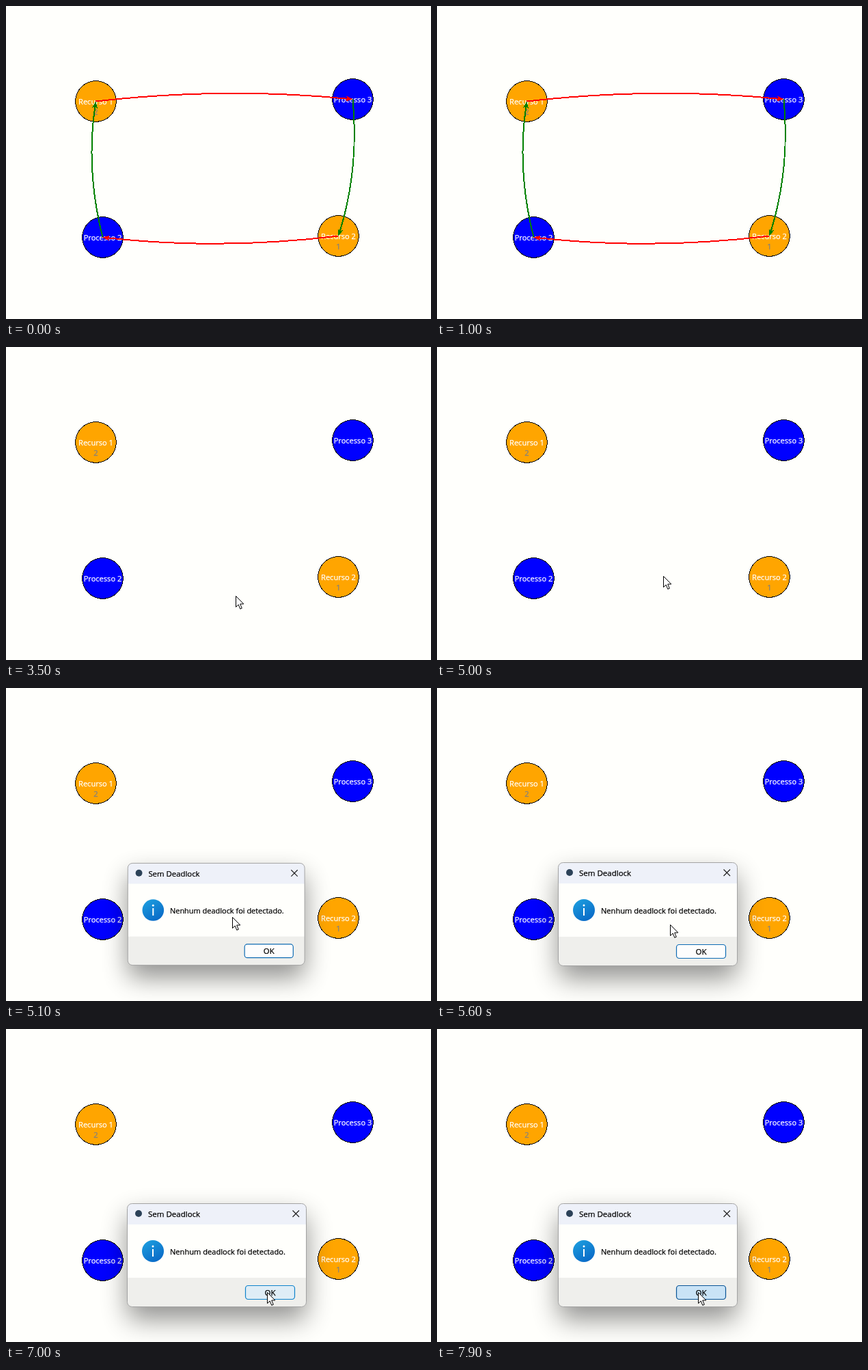
Recreate the animation shown at these times as an HTML page. Size 622x458 px, loop 8000 ms.

```html
<!DOCTYPE html>
<html lang="pt">
<head>
<meta charset="utf-8">
<title>Grafo de recursos</title>
<style>
  html, body { margin: 0; width: 100%; height: 100%; overflow: hidden; background: #fffffc; }
  svg { display: block; width: 622px; height: 458px; }
  text { font-family: "Open Sans", "Noto Sans", sans-serif; font-size: 11.1px; stroke-width: .25px; }
  .crisp { shape-rendering: crispEdges; }
  #nodes text { fill: #fff; stroke: #fff; text-anchor: middle; }
  #nodes .count { fill: #808080; stroke: #808080; }
  #dialog text { fill: #000; stroke: #000; }
</style>
</head>
<body>
<svg viewBox="0 0 622 458">
  <defs>
    <linearGradient id="blue" x1="0" y1="0" x2=".6" y2="1">
      <stop offset="0" stop-color="#1fa2e0"/>
      <stop offset="1" stop-color="#0a6cc8"/>
    </linearGradient>
    <filter id="blur" x="-40%" y="-60%" width="180%" height="220%">
      <feGaussianBlur stdDeviation="19"/>
    </filter>
    <clipPath id="window"><rect x="177.5" y="255.5" width="262" height="151" rx="7"/></clipPath>
  </defs>
  <rect width="622" height="458" fill="#fffffc"/>
  <g transform="translate(.5 .5)">
    <g id="nodes"></g>
    <g id="edges" class="crisp"></g>
  </g>
  <g id="dialog">
    <rect x="178" y="273" width="261" height="152" rx="8" opacity=".43" filter="url(#blur)"/>
    <g clip-path="url(#window)">
      <rect x="177" y="255" width="263" height="152" fill="#fffffc"/>
      <rect x="177" y="255" width="263" height="31" fill="#eef1f9"/>
      <rect x="177" y="364" width="263" height="43" fill="#efefec"/>
    </g>
    <rect x="177.5" y="255.5" width="262" height="151" rx="7" fill="none" stroke="#a3a3a3"/>
    <circle cx="194" cy="270" r="5" fill="#2c4258"/>
    <text x="208" y="275" style="font-size:11.5px">Sem Deadlock</text>
    <path d="M419.5 265.5l9.5 9.5m0-9.5l-9.5 9.5" stroke="#222" stroke-width="1.2"/>
    <circle cx="215" cy="325" r="16" fill="url(#blue)"/>
    <circle cx="215" cy="318" r="1.5" fill="#fff"/>
    <path d="M215 322v11" stroke="#fff" stroke-width="2"/>
    <text x="240" y="330">Nenhum deadlock foi detectado.</text>
    <rect id="button" x="350.5" y="375.5" width="72" height="20" rx="4" stroke-width="1.2"/>
    <text x="386.5" y="390" text-anchor="middle" style="font-size:11.5px">OK</text>
  </g>
  <path id="cursor" d="M.5 .5V16.5L4.2 13L6.8 19.3L9.3 18.2L6.7 12H11.8Z" fill="#fff" stroke="#000"/>
</svg>
<script>
const LOOP = 8000, STEP = 100;
const FIRST_RELEASE = 1100, SECOND_RELEASE = 3100, DIALOG_OPEN = 5100;
const HOVER = 6000, PRESS = 7600;

const $ = id => document.getElementById(id);
const show = (el, on) => el.setAttribute('visibility', on ? 'visible' : 'hidden');

function add(parent, tag, attrs, text = '') {
  const el = document.createElementNS('http://www.w3.org/2000/svg', tag);
  for (const key in attrs) el.setAttribute(key, attrs[key]);
  el.textContent = text;
  return parent.appendChild(el);
}

const resource1 = { x: 131, y: 139, label: 'Recurso 1', count: 2 };
const resource2 = { x: 486, y: 336, label: 'Recurso 2', count: 1 };
const process2 = { x: 141, y: 338, label: 'Processo 2' };
const process3 = { x: 507, y: 136, label: 'Processo 3' };

for (const { x, y, label, count } of [resource1, resource2, process2, process3]) {
  const disc = (r, fill) => add($('nodes'), 'circle', { cx: x, cy: y, r, fill, class: 'crisp' });
  disc(30.4, '#000');
  disc(29.4, count ? 'orange' : 'blue');
  add($('nodes'), 'text', { x, y: y + 4 }, label);
  if (count) add($('nodes'), 'text', { x, y: y + 19, class: 'count' }, count);
}

// Quadratic curve bowed to the left of its direction, ending in a notched arrowhead.
function addEdge(from, to, color, until) {
  const dx = to.x - from.x, dy = to.y - from.y, length = Math.hypot(dx, dy);
  const cx = (from.x + to.x) / 2 + 20 * dy / length;
  const cy = (from.y + to.y) / 2 - 20 * dx / length;
  const reach = Math.hypot(to.x - cx, to.y - cy);
  const ux = (to.x - cx) / reach, uy = (to.y - cy) / reach;
  const back = (d, side) => `${to.x - ux * d - uy * side} ${to.y - uy * d + ux * side}`;
  const group = add($('edges'), 'g', {});
  add(group, 'path', {
    d: `M${from.x} ${from.y}Q${cx} ${cy} ${back(7, 0)}`,
    fill: 'none', stroke: color, 'stroke-width': 2
  });
  add(group, 'path', { d: `M${back(0, 0)}L${back(10, 4)}L${back(8, 0)}L${back(10, -4)}Z`, fill: color });
  return { group, until };
}

const edges = [
  addEdge(resource1, process3, 'red', SECOND_RELEASE),
  addEdge(process3, resource2, 'green', SECOND_RELEASE),
  addEdge(resource2, process2, 'red', FIRST_RELEASE),
  addEdge(process2, resource1, 'green', FIRST_RELEASE)
];

// time, x, y
const cursorPath = [
  [2400, 318, 423], [2500, 321, 411], [2600, 331, 380], [2700, 337, 362],
  [3400, 336, 364], [3900, 336, 364], [4400, 331, 335], [5500, 331, 335],
  [6000, 382, 392], [6200, 382, 385], [LOOP, 382, 385]
];

function cursorAt(t) {
  const i = cursorPath.findIndex(point => point[0] > t);
  const [t0, x0, y0] = cursorPath[i - 1], [t1, x1, y1] = cursorPath[i];
  const k = (t - t0) / (t1 - t0);
  return [Math.round(x0 + (x1 - x0) * k), Math.round(y0 + (y1 - y0) * k)];
}

function render(time) {
  const t = Math.floor(time % LOOP / STEP) * STEP;
  for (const { group, until } of edges) show(group, t < until);

  show($('dialog'), t >= DIALOG_OPEN);
  const scale = t < DIALOG_OPEN + STEP ? 0.988 : 1;
  $('dialog').setAttribute('transform', `translate(240 330) scale(${scale}) translate(-240 -330)`);
  $('button').setAttribute('fill', t >= PRESS ? '#c9e3f6' : t >= HOVER ? '#dfedf6' : '#fdfdfd');
  $('button').setAttribute('stroke', t >= PRESS ? '#0a5596' : t >= HOVER ? '#0f83cb' : '#0f6cb4');

  const cursorVisible = t >= cursorPath[0][0];
  show($('cursor'), cursorVisible);
  if (cursorVisible) $('cursor').setAttribute('transform', `translate(${cursorAt(t)})`);
}

const start = performance.now();
function tick() {
  render(performance.now() - start);
  requestAnimationFrame(tick);
}
tick();
</script>
</body>
</html>
```
